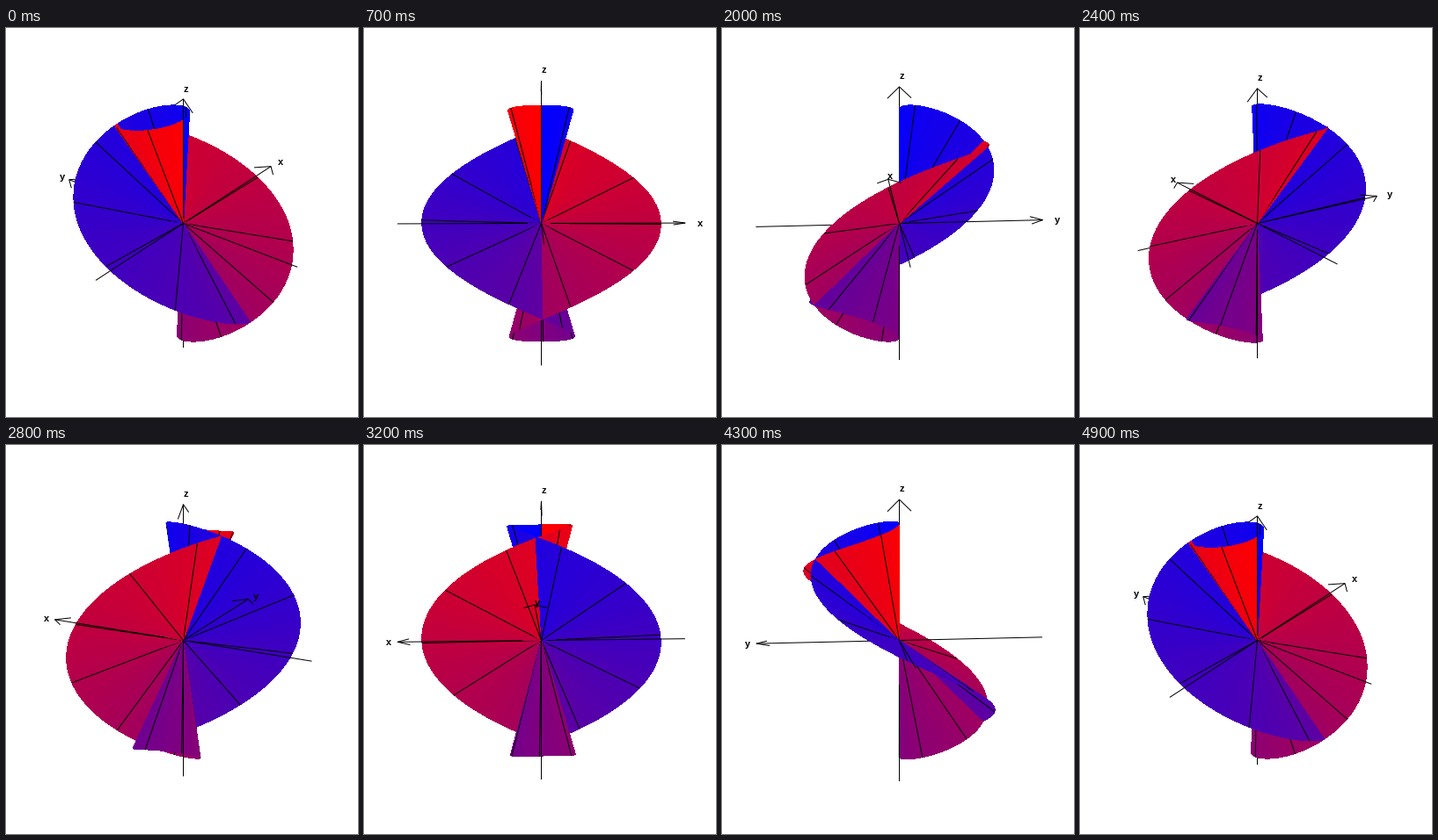
A matplotlib script for the animation above (5 s loop, 400 px wide and 443 px high).

```python
import numpy as np
import matplotlib.pyplot as plt
from matplotlib.animation import FuncAnimation
from matplotlib.collections import PolyCollection

W, H, DPI = 400, 443, 100
PX = 72 / DPI
FRAMES = 50
CENTER = np.array([201.5, 222.5])
RADIUS = 136.25
FACETS = 398


def curve(t):
    """Clelia curve on the unit sphere; the surface is its cone over the origin."""
    return np.stack([-np.sin(t) * np.cos(2 * t),
                     np.sin(t) * np.sin(2 * t),
                     np.cos(t)], axis=-1)


def camera(frame):
    """Rows give the screen-right, screen-down and away-from-viewer directions."""
    turn = frame / (FRAMES - 1)
    az = np.radians(52.5 - 360 * turn)
    el = np.radians(30 - 50 * np.sin(np.pi * turn))
    ca, sa, ce, se = np.cos(az), np.sin(az), np.cos(el), np.sin(el)
    return np.array([[ca, -sa, 0],
                     [-se * sa, -se * ca, -ce],
                     [ce * sa, ce * ca, -se]])


# Every piece lies on rays from the origin, so the depth of its direction
# alone decides which piece is in front.
shapes, keys, faces, edges, widths = [], [], [], [], []
CLEAR, BLACK = (0, 0, 0, 0), (0, 0, 0, 1)


def add_shape(points, key, face=CLEAR, edge=CLEAR, width=0):
    shapes.append(np.array(points, float))
    keys.append(key)
    faces.append(face)
    edges.append(edge)
    widths.append(width)


def add_line(points, key):
    add_shape(points, key, edge=BLACK, width=PX)


origin = np.zeros(3)
rim = curve(np.linspace(0, 2 * np.pi, FACETS + 1))
# Hard-edged fills cover every pixel they touch, so pull the rim in half a pixel.
fill_rim = rim * (1 - 0.5 / RADIUS)
for i in range(FACETS):
    s = (i + 0.5) / FACETS
    last = min(i + 2, FACETS)
    add_shape([origin, fill_rim[i], fill_rim[last]], (rim[i] + rim[i + 1]) / 2,
              face=(1 - s, 0, s, 1))
for spoke in rim[:FACETS:20]:
    add_line([origin, spoke], spoke)

axes_dirs = np.eye(3)
for axis, side in zip(axes_dirs, axes_dirs[[1, 0, 1]]):
    add_line([origin, 1.2 * axis], axis)
    add_line([origin, -1.2 * axis], -axis)
    add_line([1.1 * axis + 0.1 * side, 1.2 * axis, 1.1 * axis - 0.1 * side], axis)

keys, faces, edges, widths = map(np.array, (keys, faces, edges, widths))
is_line = widths > 0
bias = 0.06 * is_line

fig = plt.figure(figsize=(W / DPI, H / DPI), dpi=DPI, facecolor="white")
ax = fig.add_axes([0, 0, 1, 1])
ax.set(xlim=(0, W), ylim=(H, 0))
ax.axis("off")
scene = PolyCollection([], closed=False, zorder=2, snap=False)
ax.add_collection(scene, autolim=False)
labels = [ax.text(0, 0, name, family="Liberation Sans", weight="bold",
                  fontsize=11 * PX, ha="left", va="baseline") for name in "xyz"]


def draw(frame):
    view = camera(frame)
    order = np.argsort(bias - keys @ view[2], kind="stable")
    scene.set_verts([CENTER + RADIUS * shapes[i] @ view[:2].T for i in order],
                    closed=False)
    scene.set_facecolor(faces[order])
    scene.set_edgecolor(edges[order])
    scene.set_linewidth(widths[order])
    scene.set_antialiased(is_line[order])
    for label, axis in zip(labels, axes_dirs):
        x, y, depth = view @ axis
        label.set_position(CENTER + 1.3 * RADIUS * np.array([x, y]) + (0, 4))
        label.set_zorder(1 if depth > 0 else 3)
    return [scene, *labels]


anim = FuncAnimation(fig, draw, frames=FRAMES, interval=100, repeat=True,
                     repeat_delay=0)
plt.show()
```
